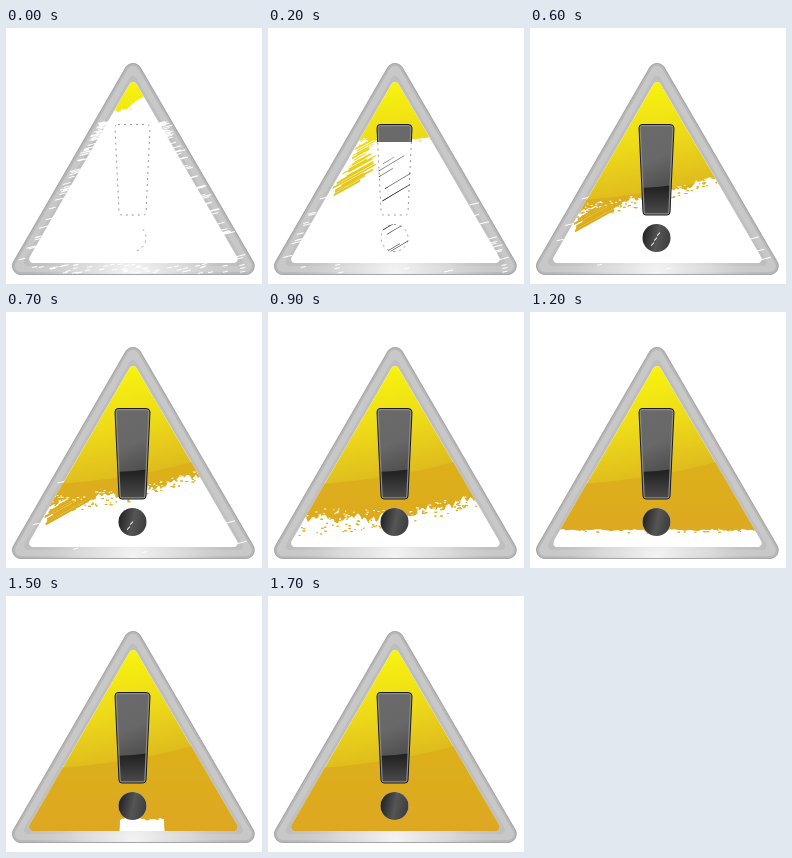
An HTML page with a canvas for the animation above (1.8 s loop, 256x256 px).

```html
<!DOCTYPE html>
<html>
<head>
<meta charset="utf-8">
<style>
html, body { margin: 0; width: 100%; height: 100%; overflow: hidden; background: #fff; }
canvas { display: block; width: 256px; height: 256px; }
</style>
</head>
<body>
<canvas id="stage" width="256" height="256"></canvas>
<script>
const ctx = document.getElementById('stage').getContext('2d');
const STEP = 100, STEPS = 18;

// step, edge height at left / middle / right, uncovered span, roughness
const KEYS = [
  [0, 118, 76, 22, 0, 256, 3],
  [2, 116, 111, 109, 0, 256, 2],
  [6, 186, 168, 137, 0, 256, 4],
  [9, 207, 204, 183, 0, 256, 7],
  [12, 218, 218, 218, 24, 256, 1.5],
  [15, 224, 222, 224, 113, 159, 3],
  [17, 236, 236, 236, 136, 136, 0]
];
const BAR_EDGE = [90, 100, 114, 138, 162, 185];

const lerp = (a, b, p) => a + (b - a) * p;
const rand = n => { const v = Math.sin(n * 127.1 + 11.7) * 43758.5453; return v - Math.floor(v); };

function stateAt(k) {
  const i = Math.max(1, KEYS.findIndex(key => key[0] >= k));
  const a = KEYS[i - 1], b = KEYS[i], p = (k - a[0]) / (b[0] - a[0]);
  return a.map((v, j) => lerp(v, b[j], p));
}

function withStops(g, colors) {
  colors.forEach((c, i) => g.addColorStop(i / (colors.length - 1), c));
  return g;
}
const linear = (x0, y0, x1, y1, ...colors) => withStops(ctx.createLinearGradient(x0, y0, x1, y1), colors);
const radial = (x, y, r, ...colors) => withStops(ctx.createRadialGradient(x, y, 0, x, y, r), colors);

// Rounded triangle, moved inward by d
function triangle(d) {
  const p = new Path2D(), r = Math.max(4, 9 - d);
  const left = -0.6 + 1.732 * d, right = 255.4 - 1.732 * d, top = 26 + 2 * d, base = 247 - d;
  p.moveTo(127, base);
  p.arcTo(left, base, 127, top, r);
  p.arcTo(127, top, right, base, r);
  p.arcTo(right, base, 127, base, r);
  p.closePath();
  return p;
}

const inner = triangle(12);
const gloss = new Path2D('M20 174Q140 168 210 142L256 256H0Z');
const bar = new Path2D('M112 96.500H140Q144 96.500 144 100L140 184Q140 187 137 187H116Q113 187 113 184L109 100Q109 96.500 112 96.500Z');
const dot = new Path2D();
dot.arc(126.5, 210, 14, 0, 7);
const mark = new Path2D(bar);
mark.addPath(dot);
const barShade = new Path2D('M100 160Q128 160 150 156V192H100Z');

function streak(path, x, y, length, width, slope = 0.55) {
  const h = length * slope;
  path.moveTo(x, y);
  path.lineTo(x + length, y - h);
  path.lineTo(x + length, y - h + width);
  path.lineTo(x, y + width);
  path.closePath();
}

function clipped(paths, draw) {
  ctx.save();
  paths.forEach(p => ctx.clip(p));
  draw();
  ctx.restore();
}

function fill(path, style) {
  ctx.fillStyle = style;
  ctx.fill(path);
}

function drawBorder(k) {
  fill(triangle(0), '#a6a6a6');
  fill(triangle(1), '#b8b8b8');
  fill(triangle(3), '#c8c8c8');
  fill(triangle(9), '#bebebe');
  fill(triangle(1), radial(127, 246, 110, '#f4f4f4', '#e2e2e2b0', '#c8c8c800'));
  fill(inner, '#fff');
  const scratches = new Path2D();
  const count = [170, 60, 30, 22, 16, 12, 8, 6, 4][k] || 0;
  for (let i = 0; i < count; i++) {
    const p = rand(i);
    if (i % 3 === 2) {
      streak(scratches, 12 + p * 225, 236 + rand(i + 40) * 9, 5, 1, 0.2);
    } else {
      const y = lerp(k ? 165 : 95, 232, k ? p : p * p);
      const half = (y - 44) * 0.577 + rand(i + 70) * 5;
      streak(scratches, 127 + (i % 3 ? half - 7 : -half - 1), y, 5 + rand(i + 9) * 6, 1, 0.25);
    }
  }
  fill(scratches, '#fff');
}

function drawYellow(k) {
  const [, left, mid, right, lo, hi, rough] = stateAt(k);
  const edge = x => x < 127 ? lerp(left, mid, (x - 30) / 97) : lerp(mid, right, (x - 127) / 98);
  const reveal = new Path2D(), holes = new Path2D();
  reveal.moveTo(0, 0);
  reveal.lineTo(256, 0);
  for (let x = 256; x >= 0; x -= 2) {
    const wave = rand(x + k) - 0.5 + Math.sin(x * 0.17 + k) * 0.4;
    reveal.lineTo(x, x < lo || x > hi ? 256 : edge(x) + wave * rough);
  }
  reveal.closePath();
  // Brush strokes running down the left side
  if (k > 0 && k < 8) {
    for (let i = 0; i < 24; i++) {
      const y = 166 + (k - 2) * 9 - i * 2.3;
      const x = 127 - (y - 50) * 0.577 + rand(i) * 8;
      streak(reveal, x, y, (108 - x) * (0.5 + rand(i + 5) * 0.5), 0.8 + rand(i + 8) * 1.4);
    }
  }
  if (k < 15) {
    const specks = k > 2 && k < 10 ? 170 : 24;
    for (let i = 0; i < specks; i++) {
      const p = rand(i + k * 7), x = lerp(28, 228, p);
      const offset = (rand(i + 300) - 0.4) * rough * lerp(4, 1.5, p);
      (offset > 0 ? reveal : holes).rect(x, edge(x) + offset, 1 + rand(i) * 2, 1);
    }
  }
  clipped([inner, reveal], () => {
    fill(inner, linear(115, 50, 140, 170, '#f8f60c', '#eedb18', '#dcb61f'));
    fill(gloss, linear(0, 155, 0, 235, '#dcb01a', '#dea722'));
    if (k < 17) fill(holes, '#fff');
  });
}

function drawMark(k) {
  const reveal = new Path2D();
  reveal.rect(0, 0, 256, k < 6 ? BAR_EDGE[k] : 256);
  if (k > 0 && k < 6) {
    for (let i = 0; i < 2 + k * 4; i++) {
      streak(reveal, 105 + rand(i) * 14, lerp(126, 230, rand(i + 20)), 10 + rand(i + 3) * 18, 0.3 + k * 0.2, 0.6);
    }
  }
  fill(mark, '#fff');
  ctx.lineWidth = 1;
  if (k < 6) {
    ctx.strokeStyle = '#999';
    ctx.setLineDash([2, 4]);
    ctx.stroke(bar);
    ctx.beginPath();
    ctx.arc(126.5, 210, 13.5, -0.7, k ? 5.5 : 1.5);
    ctx.stroke();
    ctx.setLineDash([]);
  }
  clipped([reveal], () => {
    fill(dot, linear(113, 210, 140, 216, '#262626', '#555', '#3c3c3c'));
    clipped([bar], () => {
      fill(bar, linear(112, 96, 142, 165, '#6a6a6a', '#686868', '#484848'));
      fill(barShade, linear(0, 157, 0, 187, '#1e1e1e', '#4c4c4c'));
      ctx.strokeStyle = '#8a8a8a';
      ctx.lineWidth = 3.5;
      ctx.stroke(bar);
    });
    ctx.strokeStyle = '#1c1c1c';
    ctx.lineWidth = 1;
    ctx.stroke(bar);
  });
  if (k > 5 && k < 9) {
    const flecks = new Path2D();
    for (let i = 0; i < 9 - k; i++) streak(flecks, 121 + i * 3, 217 - i * 5, 3, 1.2, 1);
    fill(flecks, '#fff');
  }
}

const start = performance.now();

function frame() {
  const k = Math.floor((performance.now() - start) / STEP) % STEPS;
  ctx.clearRect(0, 0, 256, 256);
  drawBorder(k);
  drawYellow(k);
  drawMark(k);
  requestAnimationFrame(frame);
}
frame();
</script>
</body>
</html>
```
